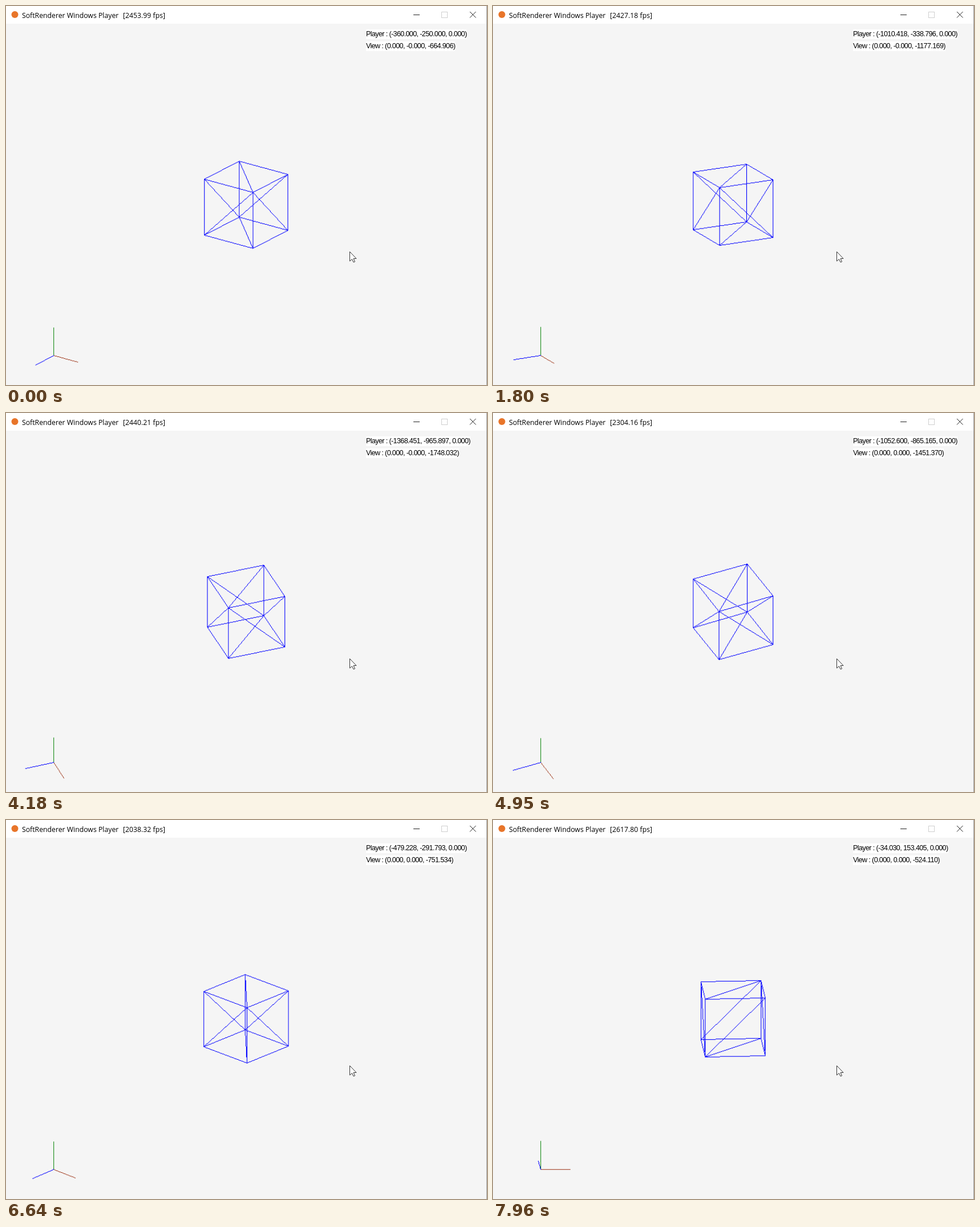
An HTML page with a canvas that plays this animation: 843 px wide and 664 px high, repeating every 8 s.

```html
<!DOCTYPE html>
<html lang="en">
<head>
<meta charset="utf-8">
<title>SoftRenderer Windows Player</title>
<style>
  html, body { margin: 0; width: 100%; height: 100%; overflow: hidden; background: #f5f5f5; }
  canvas { position: absolute; left: 0; top: 0; display: block; }
  div { position: absolute; white-space: pre; color: #000; font-kerning: none; }
  .bar { top: 8px; font: 12.25px/18px "Open Sans", "Noto Sans", sans-serif; }
  .info {
    left: 631px; height: 17px; background: #fff;
    font: 12.5px/17px "Liberation Sans", Arial, sans-serif; letter-spacing: -0.6px;
  }
</style>
</head>
<body>
<canvas id="stage" width="843" height="664"></canvas>
<div class="bar" style="left:28px">SoftRenderer Windows Player</div>
<div class="bar" style="left:205px" id="fps"></div>
<div class="info" style="top:41px" id="player"></div>
<div class="info" style="top:62px" id="view"></div>
<script>
const LOOP = 8000, HOLD = 400, STEP = 70, FPS_STEP = 525;
const W = 800, H = 600, HALF = 50, BLUE = '#0000ff';
const $ = id => document.getElementById(id);
const ctx = $('stage').getContext('2d');
const buf = document.createElement('canvas');
buf.width = W;
buf.height = H;
const pix = buf.getContext('2d');

// Turning points of the player: time, x, y. The camera stays at (0, 0, 500).
const PATH = [
  [355, -360, -250], [1534.74, -921.622, -250],
  [3618.24, -1619.073, -947.45], [3626.78, -1619.073, -965.897],
  [4654.85, -1153.332, -965.897], [6630, -479.228, -291.793], [7960, -34.03, 153.405]
];
// Frame rate: counter update, value
const RATE = [
  [0, 2453.99], [3, 2427.18], [5, 2495.63], [7, 2440.21],
  [10, 2236.14], [12, 2038.32], [15, 2617.80]
];

// Linear interpolation along keys of the form [at, ...values]
function track(keys, at) {
  const i = keys.findIndex(k => k[0] > at);
  if (i <= 0) return keys[i ? keys.length - 1 : 0].slice(1);
  const a = keys[i - 1], b = keys[i];
  const k = (at - a[0]) / (b[0] - a[0]);
  return a.slice(1).map((v, j) => v + (b[j + 1] - v) * k);
}

// Bresenham line on the low-resolution buffer
function line(a, b, color) {
  let [x, y] = a;
  const dx = Math.abs(b[0] - x), dy = -Math.abs(b[1] - y);
  const sx = x < b[0] ? 1 : -1, sy = y < b[1] ? 1 : -1;
  let err = dx + dy;
  pix.fillStyle = color;
  for (;;) {
    pix.fillRect(x, y, 1, 1);
    if (x === b[0] && y === b[1]) break;
    const e = 2 * err;
    if (e >= dy) { err += dy; x += sx; }
    if (e <= dx) { err += dx; y += sy; }
  }
}

function drawScene(px, py, dist) {
  const z = [-px / dist, -py / dist, 500 / dist];
  const n = Math.hypot(z[0], z[2]);
  const right = [z[2] / n, 0, -z[0] / n];
  const up = [z[1] * right[2], n, -z[1] * right[0]];
  const dot = (a, b) => a[0] * b[0] + a[1] * b[1] + a[2] * b[2];
  const project = (v, cx, cy) => [
    Math.floor(cx + HALF * dot(right, v)),
    Math.ceil(cy - HALF * dot(up, v))
  ];

  pix.clearRect(0, 0, W, H);
  const axis = (v, color) => line([79, 551], project(v, 79, 551), color);
  axis([1, 0, 0], '#a03c20');
  axis([0, 1, 0], '#008000');
  axis([0, 0, 1], BLUE);

  // Bits 1, 2 and 4 of a corner's index are its x, y and z sides.
  const corner = [];
  for (let i = 0; i < 8; i++) {
    const v = [1, 2, 4].map(bit => i & bit ? 1 : -1);
    corner.push(project(v, W / 2, H / 2));
  }
  const edge = (a, b) => line(corner[a], corner[b], BLUE);
  for (let i = 0; i < 8; i++)
    for (const bit of [1, 2, 4]) if (!(i & bit)) edge(i, i | bit);
  for (const [a, b] of [[2, 7], [0, 5], [6, 0], [7, 1], [4, 7], [0, 3]]) edge(a, b);

  ctx.drawImage(buf, 0, 31, W * 1.052, H * 1.054);
}

function shape(points, stroke, fill) {
  ctx.beginPath();
  points.forEach(([x, y]) => ctx.lineTo(x, y));
  if (fill) {
    ctx.closePath();
    ctx.fillStyle = fill;
    ctx.fill();
  }
  ctx.strokeStyle = stroke;
  ctx.stroke();
}

function drawWindow() {
  ctx.fillStyle = '#f5f5f5';
  ctx.fillRect(0, 0, 843, 664);
  ctx.fillStyle = '#fff';
  ctx.fillRect(0, 0, 843, 31);
  ctx.fillStyle = '#9a9a9a';
  ctx.fillRect(842, 0, 1, 664);

  ctx.fillStyle = '#e8752a';
  ctx.beginPath();
  ctx.arc(15.5, 15, 6, 0, 7);
  ctx.fill();

  shape([[714, 15.5], [725, 15.5]], '#222');
  ctx.strokeStyle = '#cfcfcf';
  ctx.strokeRect(763.5, 10.5, 10, 10);
  shape([[813, 10], [823.5, 20.5]], '#222');
  shape([[823.5, 10], [813, 20.5]], '#222');
}

function drawCursor() {
  const outline = [[0, 0], [0, 16.5], [4, 13], [6.6, 18.5], [9, 17.5], [6.6, 12], [11.5, 12]];
  shape(outline.map(([x, y]) => [x + 602.5, y + 430.5]), '#333', '#fff');
}

function tick(now) {
  const t = now < HOLD ? 0 : HOLD + STEP * Math.floor((now - HOLD) / STEP);
  const [x, y] = track(PATH, t);
  const [rate] = track(RATE, Math.floor(t / FPS_STEP));
  const dist = Math.hypot(x, y, 500);
  drawWindow();
  drawScene(x, y, dist);
  drawCursor();

  const sign = t < LOOP * 0.58 ? '-' : '';
  $('fps').textContent = `[${rate.toFixed(2)} fps]`;
  $('player').textContent = `Player : (${x.toFixed(3)}, ${y.toFixed(3)}, 0.000)`;
  $('view').textContent = `View : (0.000, ${sign}0.000, -${dist.toFixed(3)})`;
}

const start = performance.now();
function loop() {
  tick((performance.now() - start) % LOOP);
  requestAnimationFrame(loop);
}
loop();
</script>
</body>
</html>
```
